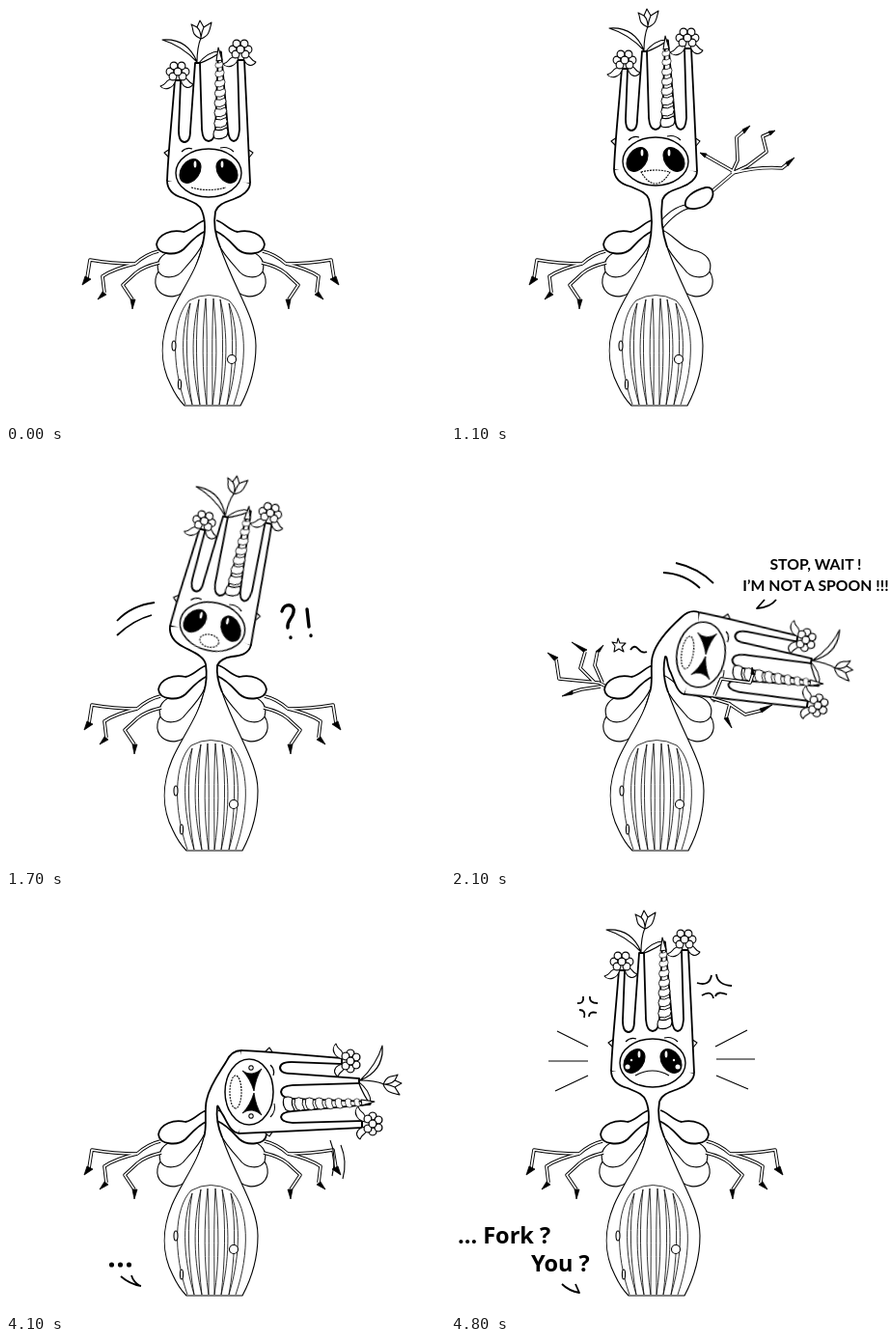
These frames come from a looping animation (455x432 px, 5.3 s). An HTML page without scripts:

```html
<!DOCTYPE html>
<html lang="en">
<head>
<meta charset="utf-8">
<title>Not a spoon</title>
<style>
html,body{margin:0;width:100%;height:100%;overflow:hidden;background:#fff}
svg{display:block;width:100vw;height:100vh}
:root{
  --up:path("M203 250C207 235 207 222 203 212C200 204 190 202 184 199C173 196 167 190 167 181L210 173L253 183C253 191 245 197 236 200C228 203 220 205 217 213C215 224 217 238 222 250");
  --mid:path("M203 250C207 233 207 216 203 206C200 198 190 196 184 193C173 190 167 184 167 175L210 167L253 177C253 185 245 191 236 194C228 197 220 199 217 207C215 220 217 236 222 250");
  --tall:path("M203 250C207 232 207 215 203 200C200 192 190 190 184 187C173 184 167 178 167 169L210 161L253 171C253 179 245 185 236 188C228 191 220 193 217 201C215 217 217 235 222 250");
  --tilt:path("M203 250C206 240 206 228 205 221C203 212 191 208 182 203C172 198 167 190 168 181L212 182L252 201C249 211 241 212 232 213C225 214 220 216 217 222C216 230 218 240 222 250");
  --lean:path("M203 250C207 240 206 228 203 216C198 204 190 196 186 184C183 172 184 164 190 158L226 183L249 221C243 227 236 225 230 222C222 218 218 221 217 226C216 232 218 240 222 250");
  --bow:path("M203 250C207 240 204 225 205 214C206 200 209 186 214 173C218 163 223 158 230 157L245 198L243 242C233 243 228 232 223 225C219 219 218 219 217 222C216 228 217 238 222 250");
  --bent:path("M203 250C207 240 203 222 206 212C210 196 226 181 236 172C242 166 248 165 254 167L256 211L239 252C232 251 229 240 225 230C220 222 222 212 219 213C217 222 217 236 222 250");
  --deep:path("M203 250C207 240 203 222 206 213C210 198 231 184 243 176C249 171 256 170 263 172L259 216L237 254C230 252 229 240 225 230C220 222 222 212 219 213C217 222 217 236 222 250");
  --rest:path("M203 250C207 240 203 222 206 211C209 196 220 182 226 172C230 163 235 160 242 160L250 203L240 246C231 245 228 236 223 227C218 220 218 216 217 218C216 226 217 238 222 250");
}
path,ellipse,circle{fill:#fff;stroke:var(--c,#000);stroke-width:var(--w,1.1);stroke-linejoin:round}
.line,.line *{fill:none}
.ink,.ink *{fill:#000}
.bold{--w:1.8}
.thin{--w:.8}
.glint{stroke:none}
.limb{--w:3.6}
.core{--c:#fff;--w:1.7}
.dash{stroke-dasharray:2 1}
text{font:700 15.8px Lato,"Open Sans",sans-serif}
.big{font:700 23.5px "Open Sans",sans-serif}

#figure{animation:sway 5.3s step-end infinite}
#head{animation:head 5.3s step-end infinite}
#neck{d:var(--up);animation:neck 5.3s step-end infinite}
#wave{transform-origin:250px 204px;animation:wave 5.3s step-end infinite}
#shake{transform-origin:160px 244px;animation:shake 5.3s step-end infinite}
.on{visibility:hidden;animation:var(--k) 5.3s step-end infinite}

@keyframes sway{
  9.43%{transform:translate(1px)}20.75%{transform:translate(2px)}
  37.73%{transform:translate(3px)}77.35%{transform:translate(2px)}
  83.01%{transform:translate(1px)}88.67%{transform:none}90.56%{transform:translate(-1px)}
}
@keyframes head{
  0%{transform:translate(210px,173px)}
  9.43%{transform:translate(210px,167px)}
  11.32%,20.75%{transform:translate(210px,161px)}
  24.52%,26.41%{transform:translate(210px,167px)}
  32.07%{transform:translate(212px,182px) rotate(12.5deg)}
  33.96%{transform:translate(226px,183px) rotate(45deg)}
  35.84%{transform:translate(245px,198px) rotate(80deg)}
  37.73%{transform:translate(259px,216px) rotate(106deg)}
  39.62%{transform:translate(256px,211px) rotate(99deg)}
  60.37%{transform:translate(256px,210px) rotate(98.5deg)}
  66.03%{transform:translate(256px,210px) rotate(97.5deg)}
  77.35%{transform:translate(250px,203px) rotate(90deg)}
  83.01%{transform:translate(226px,183px) rotate(45deg)}
  84.9%{transform:translate(212px,182px) rotate(12.5deg)}
  86.79%{transform:translate(210px,167px) rotate(-2deg)}
  88.67%,90.56%{transform:translate(210px,173px)}
}
@keyframes neck{
  9.43%{d:var(--mid)}11.32%{d:var(--tall)}24.52%{d:var(--mid)}
  32.07%{d:var(--tilt)}33.96%{d:var(--lean)}35.84%{d:var(--bow)}
  37.73%{d:var(--deep)}39.62%{d:var(--bent)}77.35%{d:var(--rest)}
  83.01%{d:var(--lean)}84.9%{d:var(--tilt)}86.79%{d:var(--mid)}88.67%{d:var(--up)}
}
@keyframes wave{
  9.43%{transform:rotate(60deg)}11.32%{transform:rotate(25deg)}
  13.2%,16.98%{transform:rotate(-7deg)}15.09%,18.86%{transform:rotate(8deg)}
  20.75%{transform:none}22.64%{transform:rotate(10deg)}24.52%{transform:rotate(40deg)}
}
@keyframes shake{
  33.96%{transform:rotate(-25deg)}35.84%{transform:rotate(6deg)}37.73%{transform:rotate(-8deg)}
  39.62%{transform:none}66.03%{transform:rotate(-4deg)}71.69%{transform:none}
}
@keyframes calm{0%,26.41%{visibility:visible}9.43%,32.07%{visibility:hidden}}
@keyframes smile{9.43%{visibility:visible}26.41%{visibility:hidden}}
@keyframes gasp{32.07%{visibility:visible}33.96%{visibility:hidden}}
@keyframes squeeze{33.96%{visibility:visible}83.01%{visibility:hidden}}
@keyframes open{0%,83.01%{visibility:visible}33.96%{visibility:hidden}}
@keyframes sad{83.01%{visibility:visible}}
@keyframes sniff{77.35%{visibility:visible}83.01%{visibility:hidden}}
@keyframes leftDown{0%,77.35%{visibility:visible}33.96%{visibility:hidden}}
@keyframes leftUp{33.96%{visibility:visible}77.35%{visibility:hidden}}
@keyframes rightDown{0%,26.41%,60.37%{visibility:visible}9.43%,33.96%{visibility:hidden}}
@keyframes rightUp{33.96%{visibility:visible}60.37%{visibility:hidden}}
@keyframes shout{39.62%{visibility:visible}60.37%{visibility:hidden}}
@keyframes dizzy{39.62%{visibility:visible}77.35%{visibility:hidden}}
@keyframes dot1{60.37%{visibility:visible}84.9%{visibility:hidden}}
@keyframes dot2{66.03%{visibility:visible}84.9%{visibility:hidden}}
@keyframes dot3{71.69%{visibility:visible}84.9%{visibility:hidden}}
@keyframes fork{86.79%{visibility:visible}}
@keyframes you{90.56%{visibility:visible}}
</style>
</head>
<body>
<svg viewBox="0 0 455 432">
<defs>
  <g id="wing">
    <path d="M205 245C192 262 180 266 165 270C153 275 152 290 160 297C168 303 180 303 190 290Z"/>
    <path d="M207 232C194 238 188 250 175 253C160 256 155 265 158 275C163 284 178 282 184 273C194 262 200 255 204 246Z"/>
  </g>
  <path id="lobe" class="bold" d="M206 222C198 224 194 232 184 234C172 231 158 236 156 247C157 258 176 259 184 252C190 246 196 238 207 233"/>
  <path id="fingers" class="line" d="M158 254Q145 257 134 267Q110 267 87 263L84 282M134 267Q112 272 100 280L102 297M159 266Q142 270 134 277L121 289L131 304"/>
  <path id="reach" class="line" d="M266 194L292 172L276 163L262 155M289 173L295 160L294 136L301 130M292 172L305 166L325 151L321 135L328 132M290 173Q318 166 341 168L346 164"/>
  <path id="flail" class="line" d="M162 246L150 240L109 236L106 216M146 240L131 225L136 208M154 240L146 222L149 207M152 244L132 247L122 250"/>
  <path id="grab" class="line" d="M267 256L286 262L282 277M284 261L302 273L318 269M270 253L277 236L307 240L310 231"/>
  <g id="arm">
    <use href="#fingers" class="limb"/><use href="#fingers" class="core"/>
    <path class="ink thin" d="M82 280L79 289L88 283ZM100 296L95 304L104 299ZM129 304L131 314L134 304Z"/>
    <use href="#lobe"/>
  </g>
  <g id="bloom">
    <path d="M-4 7C-14 8 -11 14 -18 15C-14 20 -4 18 -2 8ZM4 7C12 5 10 12 16 13C12 19 5 17 3 8Z"/>
    <circle cx="-8" r="3.9"/><circle cx="8" r="3.9"/>
    <circle cx="-4" cy="-6" r="3.9"/><circle cx="4" cy="-6" r="3.9"/>
    <circle cx="-5" cy="5" r="3.9"/><circle cx="5" cy="5" r="3.9"/><circle r="3.9"/>
  </g>
  <path id="bead" d="M-6 -4Q0 -2 6 -6Q9 -2 6 3Q0 7 -6 5Q-9 1 -6 -4Z"/>
  <g id="eye">
    <ellipse class="ink" cx="-19" cy="-2" rx="9.5" ry="13.5" transform="rotate(35 -19 -2)"/>
    <ellipse class="glint" cx="-14" cy="-9" rx="1.4" ry="3.6"/>
  </g>
  <path id="wince" class="ink thin" d="M-24 -13Q-15 -7 -1 -5Q-14 -1 -22 7Q-15 -3 -24 -13Z"/>
  <path id="ribs" class="thin" d="M207 303C203 340 203 380 208 413C208 380 209 340 207 303M200 304C191 340 193 380 201 413C197 380 196 340 200 304M191 308C179 340 183 380 193 413C187 380 185 340 191 308"/>
</defs>

<g id="figure">
  <use href="#wing"/>
  <use href="#wing" transform="matrix(-1 0 0 1 424 0)"/>
  <use href="#arm" class="on" style="--k:leftDown"/>
  <use href="#arm" class="on" style="--k:rightDown" transform="matrix(-1 0 0 1 424 0)"/>

  <g class="on" style="--k:leftUp">
    <g id="shake">
      <use href="#flail" class="limb"/><use href="#flail" class="core"/>
      <path class="ink thin" d="M104 217L97 209L108 214ZM134 208L122 198L138 206ZM147 208L155 201L151 208ZM123 248L112 254L123 252Z"/>
    </g>
    <use href="#lobe"/>
  </g>

  <g class="on" style="--k:smile">
    <g id="wave">
      <use href="#reach" class="limb"/><use href="#reach" class="core"/>
      <path class="ink thin" d="M263 153L256 152L261 157ZM300 128L308 124L302 132ZM327 130L334 129L329 134ZM345 162L354 157L347 166Z"/>
      <path d="M216 222Q230 206 247 205V209Q232 212 216 232Z"/>
      <path class="bold" d="M241 207C239 199 249 191 262 188C270 187 272 195 266 203C259 211 244 212 241 207Z"/>
    </g>
  </g>

  <path d="M203 250C198 274 180 297 170 320C160 344 159 370 171 393Q177 406 185 414H243Q259 384 259 352C259 322 238 296 222 250"/>
  <g class="line thin">
    <path d="M186 413C171 370 172 323 190 305Q210 294 231 305C250 323 251 370 236 413"/>
    <use href="#ribs"/>
    <use href="#ribs" transform="matrix(-1 0 0 1 422 0)"/>
  </g>
  <circle cx="234" cy="366" r="4.5"/>
  <ellipse cx="174" cy="352" rx="2" ry="5"/>
  <ellipse cx="180" cy="392" rx="1.6" ry="5"/>

  <path id="neck" class="bold"/>

  <g id="head">
    <path d="M-40 -25L-46 -21L-41 -16M40 -25L46 -21L42 -16"/>
    <path class="line" d="M-12 -115Q-22 -140 -48 -138Q-28 -132 -12 -115Q-12 -130 -8 -140M-11 -113Q0 -127 13 -126Q5 -119 -11 -113"/>
    <path class="bold" d="M-43 8C-42 -20 -39 -45 -35 -96H-29L-31 -44Q-31 -32 -25 -32T-19 -44L-14 -114H-9L-7 -45Q-6 -33 0 -33T7 -45L10 -125H13L20 -45Q21 -33 26 -33T32 -45L30 -117H37L40 -55L43 10"/>
    <use href="#bead" x="12.5" y="-41"/>
    <use href="#bead" transform="translate(12.5 -52) scale(.9)"/>
    <use href="#bead" transform="translate(12.3 -63) scale(.85)"/>
    <use href="#bead" transform="translate(12 -73) scale(.8)"/>
    <use href="#bead" transform="translate(12 -83) scale(.75)"/>
    <use href="#bead" transform="translate(11.8 -93) scale(.7)"/>
    <use href="#bead" transform="translate(11.5 -103) scale(.62)"/>
    <use href="#bead" transform="translate(11 -112) scale(.55)"/>
    <path d="M8 -116L10 -130L14 -117Z"/>
    <use href="#bloom" x="-32" y="-105"/>
    <use href="#bloom" x="33" y="-128"/>
    <path d="M-8 -139C-19 -143 -15 -150 -18 -154L-12 -151L-9 -158L-5 -151L3 -156C1 -148 1 -142 -8 -139ZM-12 -151Q-8 -147 -8 -140Q-7 -147 -5 -151"/>
    <ellipse rx="34" ry="25" style="--w:1.4"/>
    <path class="line" d="M-28 -22Q-23 -27 -17 -25M12 -26Q20 -28 26 -22"/>
    <g class="on" style="--k:open">
      <use href="#eye"/>
      <use href="#eye" transform="scale(-1 1)"/>
    </g>
    <g class="on" style="--k:squeeze">
      <use href="#wince"/>
      <use href="#wince" transform="scale(-1 1)"/>
      <ellipse class="dash" cy="14" rx="17" ry="6"/>
    </g>
    <g class="on" style="--k:sniff"><circle cx="-25" cy="-2" r="2.2"/><circle cx="25" cy="-2" r="2.2"/></g>
    <path class="on line dash" style="--k:calm" d="M-18 15Q0 20 18 15"/>
    <path class="on dash" style="--k:smile" d="M-15 11Q0 7 15 11Q8 23 0 23T-15 11Z"/>
    <ellipse class="on dash" style="--k:gasp" cy="15" rx="10" ry="6.5"/>
    <g class="on" style="--k:sad">
      <path class="line" d="M-18 13Q0 3 17 13"/>
      <g fill="none"><circle class="glint" cx="-26" cy="4" r="2.5"/><circle class="glint" cx="26" cy="4" r="2.5"/><circle class="glint" cx="-22" cy="-3" r="1.2"/><circle class="glint" cx="22" cy="-3" r="1.2"/></g>
    </g>
  </g>

  <g class="on" style="--k:rightUp">
    <use href="#grab" class="limb"/><use href="#grab" class="core"/>
    <path class="ink thin" d="M280 277L288 287L284 276ZM317 267L330 263L319 271ZM308 231L309 224L312 232Z"/>
  </g>
</g>

<g class="on line" style="--k:gasp">
  <path class="bold" d="M115 176Q130 160 154 157M115 191Q132 175 151 170"/>
  <path stroke-linecap="round" style="--w:3.4" d="M286 166C288 157 300 158 298 167C297 174 291 175 292 183M295 193V193.5M312 164L314 182M316 191V191.5"/>
</g>

<g class="on" style="--k:shout">
  <path class="line bold" d="M220 126Q242 127 258 142M233 116Q256 121 272 137M337 154Q331 162 317 163L325 154"/>
  <text x="378" y="123" text-anchor="middle">STOP, WAIT !</text>
  <text x="378" y="145" text-anchor="middle">I’M NOT A SPOON !!!</text>
</g>
<g class="on line" style="--k:dizzy">
  <path d="M173 194L175 199L181 199L177 203L179 208L174 205L169 208L170 202L167 198L172 199Z"/>
  <path class="bold" d="M186 206Q190 200 194 205T203 208"/>
</g>

<g class="ink">
  <g class="on" style="--k:dot1">
    <circle cx="109.500" cy="382" r="2"/>
    <path class="line bold" style="fill:none" d="M119 394Q128 402 140 404M130 393Q132 400 139 404"/>
  </g>
  <circle class="on" style="--k:dot2" cx="118.500" cy="382" r="2"/>
  <circle class="on" style="--k:dot3" cx="127.500" cy="382" r="2"/>
</g>
<path class="on line" style="--k:sniff" d="M336 253Q343 270 338 290M347 258Q354 275 349 293"/>

<text class="on big" style="--k:fork" x="7" y="360">... Fork ?</text>
<g class="on" style="--k:you">
  <text class="big" x="83" y="389">You ?</text>
  <g class="line">
    <path d="M110 140L142 156M101 171H142M108 202L142 186M307 139L274 156M275 169H315M275 186L308 200"/>
    <path class="bold" d="M115 402Q122 409 133 411L129 402M131 111Q138 112 137 104M144 104Q143 111 152 111M133 118Q140 118 138 126M151 121Q143 119 143 125M255 90Q268 94 270 82M275 81Q276 92 291 93M260 103Q270 97 272 106M286 102Q276 98 274 104"/>
  </g>
</g>
</svg>
</body>
</html>
```
